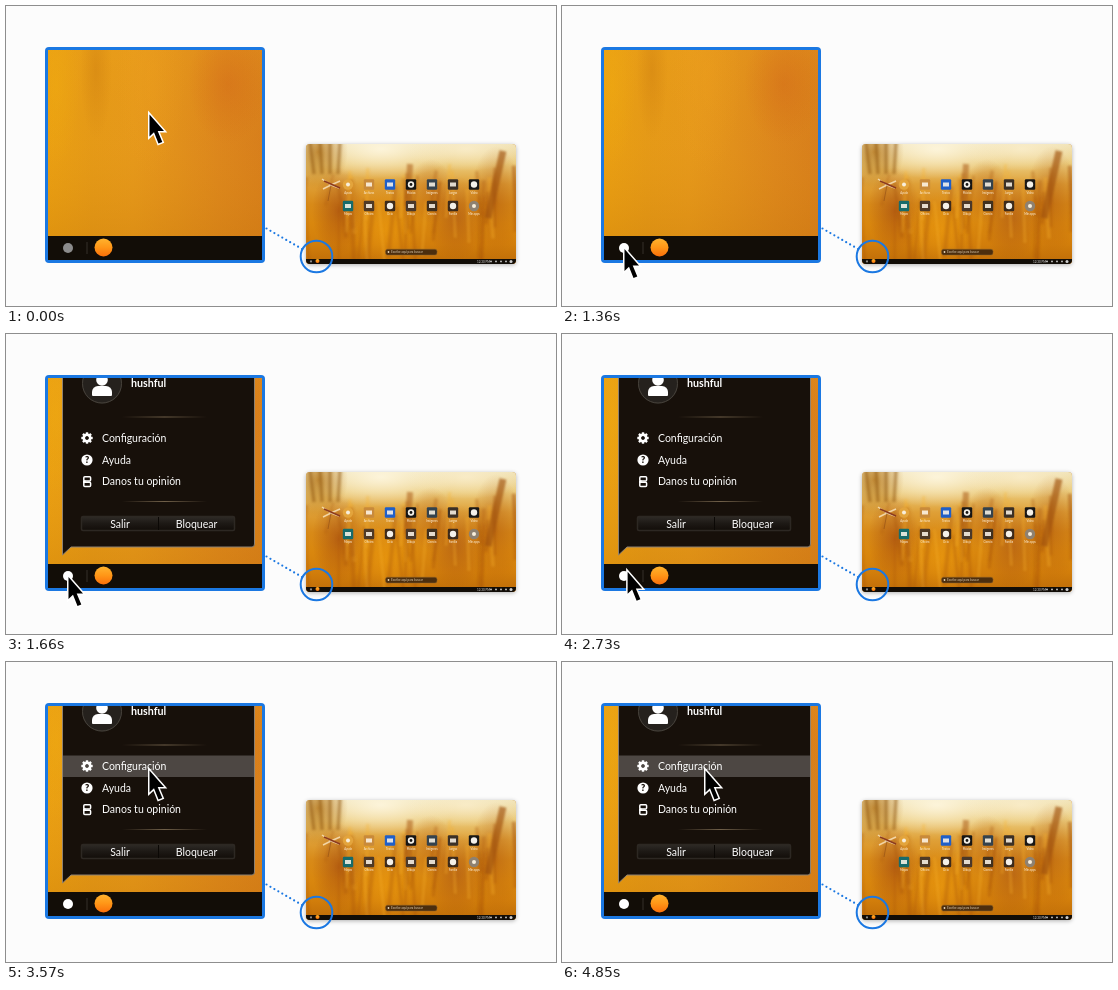
Write an HTML page with a canvas that moves like this. It is 550 px wide and 300 px high and loops after 7.08 s.

```html
<!DOCTYPE html>
<html lang="es">
<head>
<meta charset="utf-8">
<title>Menú de usuario</title>
<style>
html, body { margin: 0; width: 100%; height: 100%; overflow: hidden; background: #fcfcfc; }
canvas { display: block; width: 550px; height: 300px; }
</style>
</head>
<body>
<canvas id="stage"></canvas>
<script>
const W = 550, H = 300, LOOP = 7080, STEP = 30;
const BLUE = '#1b78e2', BAR = '#120d07', PANEL = '#17100a';
const ICON_COLORS = ['#e3a43c', '#c98a3a', '#1f5fc8', '#161514', '#34424d', '#3b3026', '#191715',
  '#176b6b', '#4f3a26', '#3d2a1a', '#4a382a', '#40301f', '#3c2a1b', '#8e8171'];
const ICON_LABELS = ['Ayuda', 'Archivos', 'Textos', 'Música', 'Imágenes', 'Juegos', 'Vídeo',
  'Mapas', 'Oficina', 'Ocio', 'Dibujo', 'Ciencia', 'Familia', 'Más apps'];
const scale = window.devicePixelRatio || 1;
const stage = document.getElementById('stage');
const back = document.createElement('canvas');
const panel = document.createElement('canvas');
let ctx;

const clamp = v => Math.max(0, Math.min(1, v));
const lerp = (a, b, k) => a + (b - a) * k;
const glide = u => 1 - Math.pow(1 - clamp(u), 1.12);

function prepare(canvas) {
  canvas.width = W * scale;
  canvas.height = H * scale;
  const c = canvas.getContext('2d');
  c.scale(scale, scale);
  return c;
}

function random(seed) {
  return () => (seed = (seed * 16807) % 2147483647) / 2147483647;
}

function gradient(x0, y0, x1, y1, ...colors) {
  const g = ctx.createLinearGradient(x0, y0, x1, y1);
  colors.forEach((c, i) => g.addColorStop(i / (colors.length - 1), c));
  return g;
}

function rect(x, y, w, h, fill) {
  ctx.fillStyle = fill;
  ctx.fillRect(x, y, w, h);
}

function round(x, y, w, h, r) {
  ctx.beginPath();
  ctx.roundRect(x, y, w, h, r);
}

function disc(x, y, r, fill) {
  ctx.beginPath();
  ctx.arc(x, y, r, 0, 7);
  ctx.fillStyle = fill;
  ctx.fill();
}

function glow(x, y, rx, ry, rgb, alpha) {
  ctx.save();
  ctx.translate(x, y);
  ctx.scale(rx, ry);
  const g = ctx.createRadialGradient(0, 0, 0, 0, 0, 1);
  g.addColorStop(0, `rgba(${rgb},${alpha})`);
  g.addColorStop(1, `rgba(${rgb},0)`);
  disc(0, 0, 1, g);
  ctx.restore();
}

function text(s, x, y, size, color, weight = 400, align = 'left') {
  ctx.font = `${weight} ${size}px Lato, sans-serif`;
  ctx.textAlign = align;
  ctx.fillStyle = color;
  ctx.fillText(s, x, y);
}

function line(x0, y0, x1, y1, color, width) {
  ctx.beginPath();
  ctx.moveTo(x0, y0);
  ctx.lineTo(x1, y1);
  ctx.strokeStyle = color;
  ctx.lineWidth = width;
  ctx.stroke();
}

function orangeBall(x, y, r) {
  disc(x, y, r, gradient(x, y - r, x, y + r, '#ffb32e', '#ff9617', '#fb6f0a'));
}

function wheatField() {
  rect(300, 138, 210, 120, gradient(0, 138, 0, 258,
    '#f0e3b8', '#ebcb7c', '#dfa037', '#d88a18', '#d9870e', '#d27e0b', '#be6c08'));
  glow(375, 143, 75, 30, '255,248,226', 0.85);
  glow(460, 143, 60, 22, '252,240,208', 0.75);
  glow(312, 146, 30, 38, '178,112,18', 0.75);
  glow(332, 205, 26, 44, '150,58,16', 0.5);
  glow(450, 212, 30, 42, '152,66,24', 0.45);
  glow(380, 225, 34, 40, '238,156,14', 0.6);
  glow(425, 185, 22, 32, '176,86,14', 0.4);
  glow(490, 195, 26, 55, '176,88,14', 0.5);
  const rnd = random(91);
  ctx.filter = `blur(${1.2 * scale}px)`;
  for (let i = 0; i < 40; i++) {
    const x = 298 + rnd() * 214, y = 158 + rnd() * 45;
    const tone = rnd() > 0.5 ? 'rgba(160,74,8,.26)' : 'rgba(250,180,45,.3)';
    line(x, y, x + rnd() * 16 - 8, y + 30 + rnd() * 50, tone, 1.5 + rnd() * 3);
  }
  for (let i = 0; i < 4; i++)
    line(304 + i * 10, 136, 308 + i * 8, 168, 'rgba(140,82,12,.45)', 3.5);
  line(497, 145, 482, 212, 'rgba(160,82,14,.65)', 7);
  line(404, 158, 402, 200, 'rgba(165,84,16,.5)', 6);
  ctx.filter = 'none';
}

function insect() {
  for (const [dx, dy] of [[-9, -6], [-8, 4], [9, -4], [8, 3]])
    line(325, 179, 325 + dx, 179 + dy, 'rgba(250,232,195,.8)', 1.5);
  line(318, 175, 334, 182, '#8c3a1d', 1.6);
  line(325, 179, 322, 195, 'rgba(120,60,20,.6)', 0.7);
}

function icons() {
  ICON_COLORS.forEach((color, i) => {
    const x = 342 + (i % 7) * 21, y = i < 7 ? 178.5 : 200;
    if (i === 0 || i === 13) {
      disc(x, y, 5.2, color);
      disc(x, y, 2, '#f8eedb');
    } else {
      round(x - 5.2, y - 5.2, 10.4, 10.4, 1.2);
      ctx.fillStyle = color;
      ctx.fill();
      if (i % 3 === 0) disc(x, y, 3.2, '#f4f0e8');
      else rect(x - 3, y - 2, 6, 4, 'rgba(255,248,235,.85)');
      if (i === 3) disc(x, y, 1.4, '#161514');
    }
    text(ICON_LABELS[i], x, y + 9, 2.8, '#fff3df', 400, 'center');
  });
}

function desktop() {
  ctx.save();
  ctx.shadowColor = 'rgba(0,0,0,.3)';
  ctx.shadowBlur = 4 * scale;
  ctx.shadowOffsetY = scale;
  round(300, 138, 210, 120, 4);
  ctx.fillStyle = '#c87d18';
  ctx.fill();
  ctx.restore();

  ctx.save();
  round(300, 138, 210, 120, 4);
  ctx.clip();
  wheatField();
  insect();
  icons();
  round(379.5, 243.2, 51.5, 5.8, 2);
  ctx.fillStyle = '#4c2e0e';
  ctx.fill();
  ctx.strokeStyle = '#8d622a';
  ctx.lineWidth = 0.5;
  ctx.stroke();
  disc(382.5, 246, 0.9, '#e8d9c0');
  text('Escribe aquí para buscar', 385, 247.2, 3, '#e0cfb4');
  rect(300, 253, 210, 5, BAR);
  disc(305, 255.4, 1.1, '#8c8a86');
  orangeBall(311.5, 255, 2);
  text('12:30 PM', 471, 256.6, 3, '#ddd');
  for (let i = 0; i < 5; i++) disc(485 + i * 5, 255.4, i === 4 ? 1.5 : 0.9, '#cfcfcf');
  ctx.restore();
}

function callout() {
  for (let i = 0; i < 10; i++)
    disc(lerp(260.5, 296, i / 9), lerp(222.5, 243, i / 9), 1.1, BLUE);
  ctx.beginPath();
  ctx.arc(310.5, 250.5, 15.8, 0, 7);
  ctx.strokeStyle = BLUE;
  ctx.lineWidth = 2;
  ctx.stroke();
}

function zoomWindow() {
  round(39, 41, 220, 216, 4);
  ctx.fillStyle = BLUE;
  ctx.fill();
  ctx.save();
  ctx.beginPath();
  ctx.rect(42, 44, 214, 210);
  ctx.clip();
  rect(42, 44, 214, 210, gradient(42, 0, 256, 0,
    '#eaa012', '#e59a17', '#e6991b', '#e1901c', '#dc861d', '#d77e1c'));
  rect(42, 44, 214, 210, gradient(0, 44, 0, 232,
    'rgba(240,165,25,.2)', 'rgba(225,145,20,.05)', 'rgba(200,120,8,.32)'));
  glow(90, 64, 16, 70, '198,118,14', 0.35);
  glow(145, 70, 35, 100, '238,160,30', 0.35);
  glow(222, 78, 40, 60, '208,98,24', 0.4);
  glow(50, 80, 24, 80, '240,172,16', 0.45);
  rect(42, 230, 214, 24, BAR);
  rect(80.5, 236, 1, 12, '#34302b');
  orangeBall(97.5, 241.5, 9);
  ctx.restore();
}

function gear(x, y) {
  ctx.save();
  ctx.translate(x, y);
  for (let i = 0; i < 8; i++) {
    rect(-1.2, -5.7, 2.4, 3, '#fff');
    ctx.rotate(Math.PI / 4);
  }
  ctx.beginPath();
  ctx.arc(0, 0, 3.2, 0, 7);
  ctx.strokeStyle = '#fff';
  ctx.lineWidth = 2.6;
  ctx.stroke();
  ctx.restore();
}

function bubbles(x, y) {
  ctx.strokeStyle = '#fff';
  ctx.lineWidth = 1.5;
  round(x - 3.2, y - 4.8, 6.8, 4.2, 1);
  ctx.stroke();
  round(x - 3.2, y + 0.7, 6.8, 4.2, 1);
  ctx.stroke();
  rect(x - 4, y - 1.2, 2.6, 2.6, '#fff');
}

function avatar() {
  disc(96, 49.5, 20, '#25211d');
  ctx.beginPath();
  ctx.arc(96, 49.5, 19.5, 0, 7);
  ctx.strokeStyle = '#47423b';
  ctx.lineWidth = 1;
  ctx.stroke();
  disc(96, 46, 5.8, '#fff');
  round(86, 52, 20, 10, [6, 6, 1, 1]);
  ctx.fillStyle = '#fff';
  ctx.fill();
}

function separator(y) {
  rect(116, y, 85, 1, gradient(116, 0, 201, 0, 'rgba(150,130,100,0)', 'rgba(150,130,100,.7)', 'rgba(150,130,100,0)'));
}

function menu() {
  ctx.beginPath();
  ctx.rect(42, 44, 214, 186);
  ctx.clip();
  ctx.beginPath();
  ctx.moveTo(56.5, 30);
  ctx.lineTo(56.5, 221);
  ctx.lineTo(65, 213);
  ctx.lineTo(246, 213);
  ctx.quadraticCurveTo(248.5, 213, 248.5, 210);
  ctx.lineTo(248.5, 30);
  ctx.fillStyle = PANEL;
  ctx.fill();
  ctx.strokeStyle = '#8e8171';
  ctx.lineWidth = 1;
  ctx.stroke();

  avatar();
  text('hushful', 125, 53, 10.7, '#fff', 700);
  separator(82.5);
  gear(81, 104);
  text('Configuración', 96, 107.8, 10.5, '#fff');
  disc(81, 126, 5.6, '#fff');
  text('?', 81, 129.4, 9, PANEL, 900, 'center');
  text('Ayuda', 96, 129.6, 10.5, '#fff');
  bubbles(81, 147.6);
  text('Danos tu opinión', 96, 151.4, 10.5, '#fff');
  separator(167);

  round(75.5, 182.5, 153, 14, 1.5);
  ctx.fillStyle = gradient(0, 182, 0, 197, '#302c28', '#1d1915', '#110c08');
  ctx.fill();
  ctx.strokeStyle = '#2d2823';
  ctx.stroke();
  rect(152, 183, 1, 13, '#0b0805');
  text('Salir', 114, 193.6, 10.5, '#fff', 400, 'center');
  text('Bloquear', 190.5, 193.6, 10.5, '#fff', 400, 'center');
}

function pointer(x, y, size) {
  ctx.save();
  ctx.translate(x, y);
  ctx.scale(size, size);
  ctx.beginPath();
  for (const [px, py] of [[1.5, 3], [1.5, 25], [6, 20.8], [10.5, 32], [14.3, 30.4], [9.7, 19.6], [16, 19.6]])
    ctx.lineTo(px, py);
  ctx.closePath();
  ctx.lineJoin = 'miter';
  ctx.miterLimit = 3;
  ctx.strokeStyle = '#fff';
  ctx.lineWidth = 3;
  ctx.stroke();
  ctx.fillStyle = '#000';
  ctx.fill();
  ctx.restore();
}

function draw(time) {
  // The scene advances in 30 ms steps within each phase.
  const since = start => Math.floor((time - start) / STEP) * STEP;
  const travel = time < 2700 ? glide(since(0) / 990) : 1 - glide(since(2700) / 870);
  const fade = Math.pow(clamp(since(1360) / 300), 2);
  const hover = clamp(since(3420) / 150);
  const press = Math.sin(Math.PI * clamp(since(4610) / 240));
  const lit = Math.round(lerp(140, 255, clamp(since(900) / 90)));

  ctx.drawImage(back, 0, 0, W, H);
  disc(62, 242, 5, `rgb(${lit},${lit},${lit})`);
  ctx.globalAlpha = fade;
  ctx.drawImage(panel, 0, 0, W, H);
  ctx.globalAlpha = 1;
  rect(57, 93.5, 191, 21.5, `rgba(255,255,255,${0.23 * hover * (1 + 0.5 * press)})`);
  pointer(lerp(142, 61, travel), lerp(105.5, 240, travel), 1 - 0.1 * press);
}

ctx = prepare(back);
rect(0, 0, W, H, '#fcfcfc');
desktop();
callout();
zoomWindow();

ctx = prepare(panel);
menu();

ctx = prepare(stage);
const start = performance.now();
function tick() {
  draw((performance.now() - start) % LOOP);
  requestAnimationFrame(tick);
}
tick();
</script>
</body>
</html>
```
